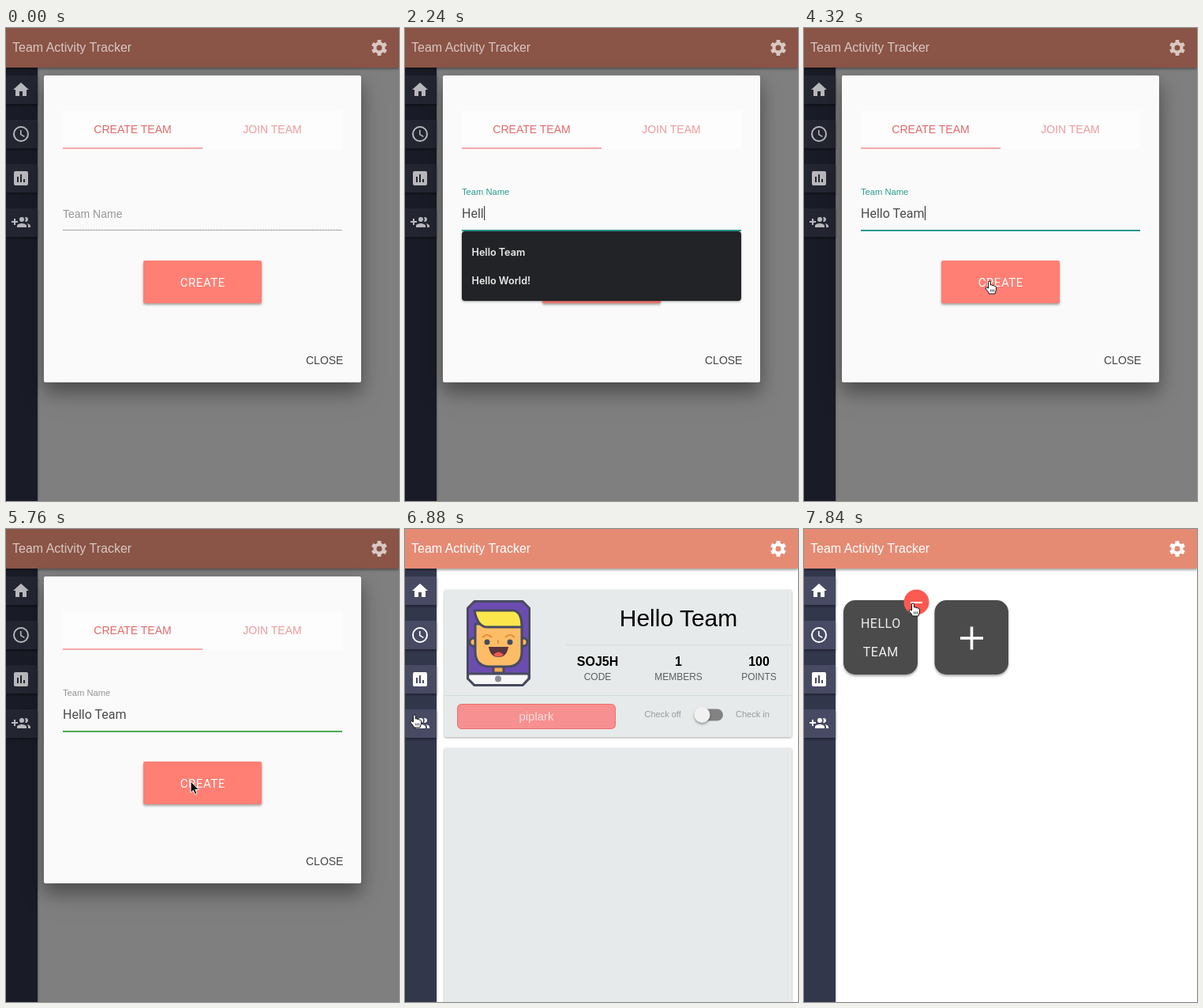
Recreate the animation shown at these times as an HTML page. Size 498 px wide and 598 px high, loop 8000 ms.

```html
<!DOCTYPE html>
<html lang="en">
<head>
<meta charset="utf-8">
<title>Team Activity Tracker</title>
<style>
  html, body { margin: 0; width: 100%; height: 100%; overflow: hidden; background: #fff; }
  svg { display: block; width: 498px; height: 598px; }
  text { font-family: "Liberation Sans", Arial, sans-serif; }
  .mid { text-anchor: middle; }
  .roboto { font-family: Roboto, sans-serif; }
  .inter { font: 600 12.6px Inter, sans-serif; fill: #ececec; }
  .value { font-size: 16px; font-weight: bold; }
  .caption { font-size: 12px; fill: #5d5f60; }
  .small { font-size: 11px; fill: #9a9c9c; }
  .raised { filter: drop-shadow(0 2px 1.5px rgba(0,0,0,.35)); }
  .sheet { filter: drop-shadow(0 1px 1.5px rgba(0,0,0,.35)); }
  .deep { filter: drop-shadow(0 12px 11px rgba(0,0,0,.3)) drop-shadow(0 10px 14px rgba(0,0,0,.14)); }
</style>
</head>
<body>
<svg viewBox="0 0 498 598">
  <defs>
    <clipPath id="sideClip"><rect y="228" width="40" height="37"/></clipPath>
    <clipPath id="buttonClip"><rect x="174" y="294" width="150" height="54" rx="2"/></clipPath>
  </defs>
  <rect width="498" height="598" fill="#fff"/>

  <g id="dashboard">
    <g fill="#e7eaea">
      <rect class="sheet" x="50" y="77" width="440" height="186" rx="2"/>
      <rect class="sheet" x="50" y="277" width="440" height="330" rx="2"/>
    </g>
    <path d="M204 146.5H490M50 210.5H490" stroke="#d3dddf"/>
    <g id="avatar" stroke="#474b60" stroke-width="3" stroke-linejoin="round">
      <path d="M88 91.500H149L157.500 100V189L149 197.500H88L79.500 189V100Z" fill="#6b4db0"/>
      <path d="M80 183H157V189L149 197.500H88L79.500 189Z" fill="#f7f7f7"/>
      <path d="M112 168V182H125V168Z" fill="#f5a94f"/>
      <circle cx="87" cy="143" r="5" fill="#fcb95f"/>
      <circle cx="150" cy="143" r="5" fill="#fcb95f"/>
      <path d="M89 120H148V155Q148 174 129 174H108Q89 174 89 155Z" fill="#fcbd66"/>
      <path d="M88 103H138Q148 105 148 124H104Q92 124 88 103Z" fill="#fbe64c"/>
      <path d="M98 137Q104 131 110 137M127 137Q133 131 139 137" fill="none" stroke="#e58f3c" stroke-width="2"/>
      <path d="M118 140V145" stroke="#e58f3c" stroke-width="2"/>
      <g stroke="none">
        <circle cx="104" cy="143" r="3.500" fill="#474b60"/>
        <circle cx="133" cy="143" r="3.500" fill="#474b60"/>
        <path d="M106 149H131Q129 162 118.500 162T106 149Z" fill="#5b3441"/>
        <path d="M112 159Q118.500 152 125 159Q118.500 164 112 159Z" fill="#ec5a56"/>
        <circle cx="118" cy="189.500" r="4" fill="#8b8d98"/>
      </g>
    </g>
    <text class="mid" x="346.500" y="123" font-size="30">Hello Team</text>
    <g class="mid">
      <text class="value" x="244" y="173">SOJ5H</text><text class="caption" x="244" y="191">CODE</text>
      <text class="value" x="346.500" y="173">1</text><text class="caption" x="346.500" y="191">MEMBERS</text>
      <text class="value" x="448.500" y="173">100</text><text class="caption" x="448.500" y="191">POINTS</text>
    </g>
    <rect x="66.500" y="221.500" width="200" height="31" rx="5" fill="#f79090" stroke="#ee6c6c"/>
    <text class="mid" x="166.500" y="242" font-size="15" fill="#fbdcdc">piplark</text>
    <text class="small" x="303.500" y="238">Check off</text>
    <text class="small" x="419" y="238">Check in</text>
    <rect x="367" y="227.500" width="36" height="15" rx="7.500" fill="#828282"/>
    <circle class="raised" cx="376.500" cy="235" r="10" fill="#f1f1f1"/>
  </g>

  <g id="teams">
    <g fill="#4b4b4b">
      <rect class="raised" x="50" y="90" width="94" height="94" rx="15"/>
      <rect class="raised" x="165.500" y="90" width="93.500" height="94" rx="15"/>
    </g>
    <g class="mid" font-size="16" fill="#efefef" letter-spacing=".5">
      <text class="roboto" x="97.300" y="125">HELLO</text>
      <text class="roboto" x="97.300" y="161">TEAM</text>
    </g>
    <path d="M198 138H227M212.500 123.500V152.500" stroke="#fff" stroke-width="3.600"/>
    <g id="badge">
      <circle cx="142.500" cy="92.500" r="16" fill="#fb5a52"/>
      <path d="M135 93H150" stroke="#fff" stroke-width="2"/>
    </g>
  </g>

  <rect class="sheet" y="50" width="40" height="548" fill="#33374c"/>
  <g id="sideButtons" fill="#474a62"></g>
  <circle id="sideRipple" cx="13" cy="237" fill="#fff" clip-path="url(#sideClip)"/>
  <rect class="raised" width="498" height="50" fill="#e58b74"/>

  <g id="overlay">
    <rect width="498" height="50" opacity=".4"/>
    <rect y="50" width="498" height="548" opacity=".5"/>
  </g>

  <g id="chrome" fill="#fff">
    <text x="8" y="30" font-size="16">Team Activity Tracker</text>
    <g id="gear" transform="translate(473 25)">
      <circle r="5.500" fill="none" stroke="#fff" stroke-width="4"/>
    </g>
    <path transform="translate(7 66)" d="M10 20v-6h4v6h5v-8h3L12 3 2 12h3v8z"/>
    <g transform="translate(7 122)" fill="none" stroke="#fff">
      <circle cx="12" cy="12" r="9" stroke-width="2"/>
      <path d="M11.750 7V12.600L16.400 15.400" stroke-width="1.600"/>
    </g>
    <path transform="translate(7 178)" fill-rule="evenodd" d="M5 3H19a2 2 0 0 1 2 2V19a2 2 0 0 1-2 2H5a2 2 0 0 1-2-2V5a2 2 0 0 1 2-2ZM7 10V17H9V10ZM11 7V17H13V7ZM15 13V17H17V13Z"/>
    <g transform="translate(7 234)">
      <path d="M3 7H5V10H8V12H5V15H3V12H0V10H3Z"/>
      <circle cx="13" cy="8" r="3"/>
      <path d="M17.100 5.140A3 3 0 1 1 17.100 10.860Q18.800 8 17.100 5.140Z"/>
      <path d="M13 13c-2 0-6 1-6 3v2h12v-2c0-2-4-3-6-3zM19.600 13.200Q21 14.400 21 16V18H24V16C24 14.500 21.600 13.500 19.600 13.200Z"/>
    </g>
  </g>

  <g id="modal">
    <rect class="deep" x="48" y="60" width="402" height="388" rx="2" fill="#fafafa"/>
    <rect x="72" y="104" width="354" height="49" fill="#fdfdfd"/>
    <rect x="72" y="151" width="177" height="2" fill="#f4a9aa"/>
    <g class="mid" font-size="14">
      <text x="160.500" y="133" fill="#e06a6c">CREATE TEAM</text>
      <text x="337.500" y="133" fill="#ec9b9d">JOIN TEAM</text>
    </g>
    <text id="label" x="72">Team Name</text>
    <text id="entry" class="roboto" x="72" y="240" font-size="16" fill="#4b4b4b"></text>
    <rect id="caret" y="225" width="1" height="18" fill="#222"/>
    <path id="idleLine" d="M72 255.500H426" stroke="#555" stroke-dasharray="1 1"/>
    <rect id="line" x="72" y="255" width="354" height="2"/>
    <rect class="raised" x="174" y="294" width="150" height="54" rx="2" fill="#ff7f74"/>
    <circle id="buttonRipple" cx="235" cy="321" fill="#fff" clip-path="url(#buttonClip)"/>
    <text class="roboto mid" x="249.300" y="327" font-size="15" letter-spacing=".5" fill="#fff">CREATE</text>
    <text x="380" y="425" font-size="14" fill="#444">CLOSE</text>
    <g id="suggestions">
      <rect class="sheet" x="72" y="257" width="354" height="88" rx="4" fill="#222326"/>
      <rect id="hover" x="72" y="265" width="354" height="36" fill="#3b3c40"/>
      <text class="inter" x="84.500" y="288">Hello Team</text>
      <text class="inter" x="84.500" y="324">Hello World!</text>
    </g>
  </g>

  <g id="cursor" stroke-linejoin="round">
    <path id="arrow" d="M0 0V14.500L3.300 11.500L5.500 16.500L8 15.400L5.800 10.600H10.300Z" fill="#111" stroke="#fff"/>
    <g id="hand">
      <path d="M-1.500 9V1.400Q-1.500 0 0 0T1.500 1.400V5Q3 4.200 4 5.600Q5.500 4.800 6.300 6.300Q8.200 5.800 8.500 7.800V11L7 16H-.500Q-2 12.500-4.600 10Q-5.500 8-3.500 7.800Z" fill="#fff" stroke="#111"/>
      <path d="M1.700 10.500V13.500M3.700 10.500V13.500M5.700 10.500V13.500" stroke="#111" stroke-width=".8"/>
    </g>
  </g>
</svg>

<script>
const LOOP = 8000;
const FOCUS = 640, PICK = 3040, PRESS = 4800, CLOSE = 5800, LOADED = 6080, NAVIGATE = 6960;
const ui = Object.fromEntries([...document.querySelectorAll('[id]')].map(el => [el.id, el]));

// [time, value]: the value holds until the next entry
const typed = [[0, ''], [1280, 'H'], [1600, 'He'], [1920, 'Hel'], [2080, 'Hell'], [PICK, 'Hello Team']];
const pointer = [[0, ''], [2560, 'arrow'], [2720, 'hand'], [3360, 'arrow'], [3840, 'hand'],
  [5600, 'arrow'], [6720, 'hand'], [7200, 'arrow'], [7680, 'hand']];
// [time, x, y]: eased between entries
const route = [[2560, 200, 380], [2860, 130, 284], [3300, 130, 284], [3900, 235, 320], [5500, 235, 320],
  [5600, 234, 319], [6300, 234, 319], [6840, 12, 235], [7120, 12, 235], [7760, 138, 94]];

const clamp = v => Math.min(1, Math.max(0, v));
const progress = (t, from, to) => clamp((t - from) / (to - from));
const ease = p => p * p * (3 - 2 * p);
const mix = (a, b, p) => a + (b - a) * p;
const within = (t, from, to) => t >= from && t < to;
const step = (table, t) => table.findLast(([at]) => at <= t)[1];
const show = (el, on) => { el.style.display = on ? '' : 'none'; };
const set = (el, attrs) => { for (const key in attrs) el.setAttribute(key, attrs[key]); };

function add(parent, tag, attrs) {
  const el = document.createElementNS('http://www.w3.org/2000/svg', tag);
  set(el, attrs);
  parent.append(el);
}

function pointAt(t) {
  const next = route.findIndex(([at]) => at > t);
  if (next < 1) return (next ? route.at(-1) : route[0]).slice(1);
  const [a, b] = [route[next - 1], route[next]];
  const p = ease(progress(t, a[0], b[0]));
  return [mix(a[1], b[1], p), mix(a[2], b[2], p)];
}

function ripple(el, t, start, size, length) {
  const p = progress(t, start, start + length);
  set(el, { r: size * (1 - (1 - p) ** 2), opacity: p > 0 ? 0.4 * (1 - p) : 0 });
}

function drawField(t) {
  const focused = within(t, FOCUS, PRESS);
  const lift = ease(progress(t, FOCUS, FOCUS + 200));
  const text = step(typed, t);
  set(ui.label, {
    y: mix(240, 211, lift),
    'font-size': mix(14, 11.2, lift),
    fill: focused ? '#2a9d90' : '#969696'
  });
  ui.entry.textContent = text;
  const lastKey = typed.findLast(([at]) => at <= t)[0] || FOCUS;
  set(ui.caret, { x: 72.5 + ui.entry.getComputedTextLength() });
  show(ui.caret, focused && Math.floor((t - lastKey) / 500) % 2 === 0);
  show(ui.idleLine, t < FOCUS);
  show(ui.line, t >= FOCUS);
  set(ui.line, { fill: focused ? '#2a998d' : '#4caa4f' });
  show(ui.suggestions, within(t, 1280, PICK));
  show(ui.hover, within(t, 2720, PICK));
}

function render(t) {
  drawField(t);

  const closing = progress(t, CLOSE, LOADED);
  const scale = mix(1, 0.8, ease(closing));
  set(ui.modal, {
    opacity: 1 - closing,
    transform: `translate(249 ${mix(60, 24, closing)}) scale(${scale}) translate(-249 -60)`
  });
  show(ui.modal, closing < 1);
  set(ui.overlay, { opacity: 1 - closing });
  set(ui.chrome, { opacity: mix(0.68, 1, closing) });

  show(ui.dashboard, within(t, LOADED, NAVIGATE));
  show(ui.teams, t >= NAVIGATE);
  show(ui.badge, t >= 7520);
  ripple(ui.buttonRipple, t, PRESS, 130, 600);
  ripple(ui.sideRipple, t, 6880, 38, 480);

  const shape = step(pointer, t);
  show(ui.arrow, shape === 'arrow');
  show(ui.hand, shape === 'hand');
  set(ui.cursor, { transform: `translate(${pointAt(t)})` });
}

for (const y of [60, 116, 172, 228]) {
  add(ui.sideButtons, 'rect', { class: 'raised', y, width: 40, height: 36 });
}
for (let angle = 0; angle < 360; angle += 60) {
  add(ui.gear, 'rect', { x: -2.4, y: -10, width: 4.8, height: 4, rx: 0.6, transform: `rotate(${angle})` });
}

const start = performance.now();
function tick() {
  render((performance.now() - start) % LOOP);
  requestAnimationFrame(tick);
}
tick();
</script>
</body>
</html>
```
